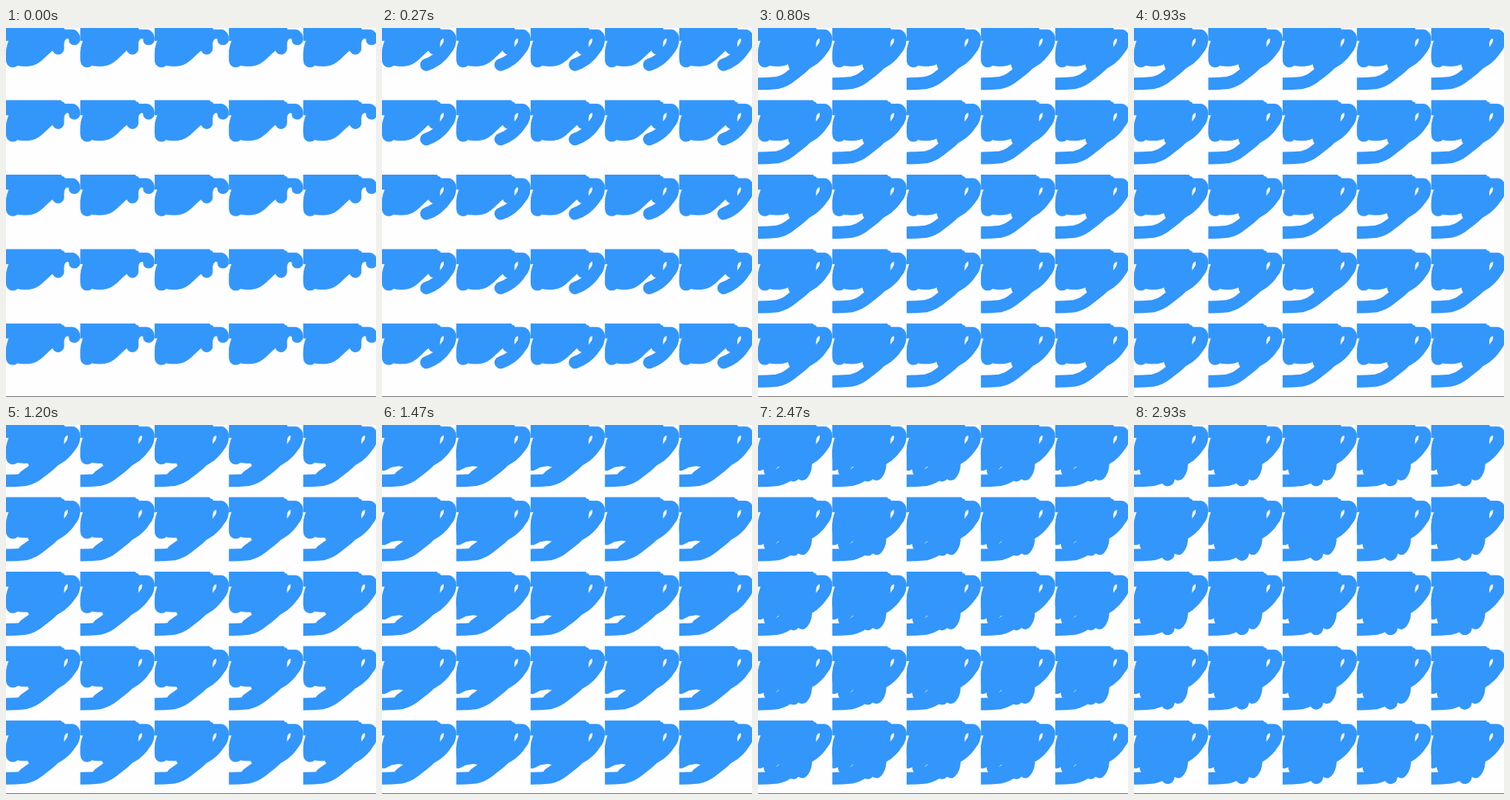
These frames come from a looping animation (480x478 px, 3070 ms). An HTML page:

```html
<!DOCTYPE html>
<html lang="en">
<head>
<meta charset="utf-8">
<title>Tiled brush</title>
<style>
  html, body { margin: 0; width: 100%; height: 100%; overflow: hidden; background: #fefdff; }
  svg { display: block; width: 100vw; height: 100vh; }
  .body { fill: #3396fa; stroke: #3396fa; stroke-width: .9; }
  .brush { fill: none; stroke: #3396fa; stroke-width: 16; stroke-linecap: round; stroke-linejoin: round; }
</style>
</head>
<body>
<svg id="stage" viewBox="0 0 480 478" preserveAspectRatio="none">
  <symbol id="tile" overflow="hidden">
    <path class="body" d="M0 0H71L72 2L75 3L76 5H86C92 5 96 11 96 17C96 22 92 25 88 24.5
      C83 24 82 21 82 18C81 15 78 15.5 76 19C74.5 22 75 25 75 29A7.4 7.4 0 0 1 60.5 31.5
      C52 38 44 50 32 51.5C27 52.5 18 52 15 51C12 54 5 54.5 2 50C-2 43 0 28 4 19H0Z"/>
    <g id="strokes" class="brush"></g>
  </symbol>
  <g id="grid"></g>
  <path d="M0 477H480V478H0Z" fill="#777"/>
</svg>
<script>
const NS = "http://www.w3.org/2000/svg";
const LOOP = 3070, STEP = 200 / 3, SIZE = 96.4, TOP = -2.8;

// Each run starts at a point; every listed piece continues it one step later.
const runs = [
  { at: 1, from: [88, 17], pieces: ["Q88.5 22 86 26.5", "L82 32", "Q79 37 71 43.5", "Q65 48 57.5 50.5",
    "L47.5 51", "L46.5 47", "Q48 42 54 36.5", "L62 30.5"] },
  { at: 9, from: [64, 46], pieces: ["Q61 51 54 56.3", "Q48 61 41.5 66", "Q35 71.3 25 73.8", "Q12 75 2 75", "L-8 75"] },
  { at: 15, from: [24, 69.5], pieces: ["L36 61", "L42 54", "L48.5 47", "L36 50.5", "L22 48", "L10 50",
    "L2 54", "L10.5 28"] },
  { at: 23, from: [22, 50], pieces: ["L15 57", "L15.5 62"] },
  { at: 32, from: [53, 63], pieces: ["h.01", "L61 50", "L62 55", "Q61.5 62 57.5 66.5", "L50 63", "L46 68", "L43.5 74"] },
  { at: 40, from: [43.5, 74], pieces: ["l1 -.3"] },
  { at: 43, from: [25, 57], pieces: ["h.01", "l-.5 -1"] }
];

function add(parent, name, attrs) {
  const el = document.createElementNS(NS, name);
  for (const key in attrs) el.setAttribute(key, attrs[key]);
  return parent.appendChild(el);
}

const strokes = document.getElementById("strokes");
for (const run of runs) run.path = add(strokes, "path", {});

const grid = document.getElementById("grid");
for (let row = 0; row < 5; row++) {
  for (let col = 0; col < 5; col++) {
    add(grid, "use", { href: "#tile", x: col * SIZE, y: TOP + row * SIZE, width: SIZE, height: SIZE });
  }
}

let shown = -1;
function draw(time) {
  const step = Math.floor((time % LOOP + 4) / STEP);
  if (step === shown) return;
  shown = step;
  for (const { at, from, pieces, path } of runs) {
    const count = Math.max(0, step - at + 1);
    path.setAttribute("d", count ? "M" + from + pieces.slice(0, count).join("") : "");
  }
}

const start = performance.now();
function tick() {
  draw(performance.now() - start);
  requestAnimationFrame(tick);
}
tick();
</script>
</body>
</html>
```
